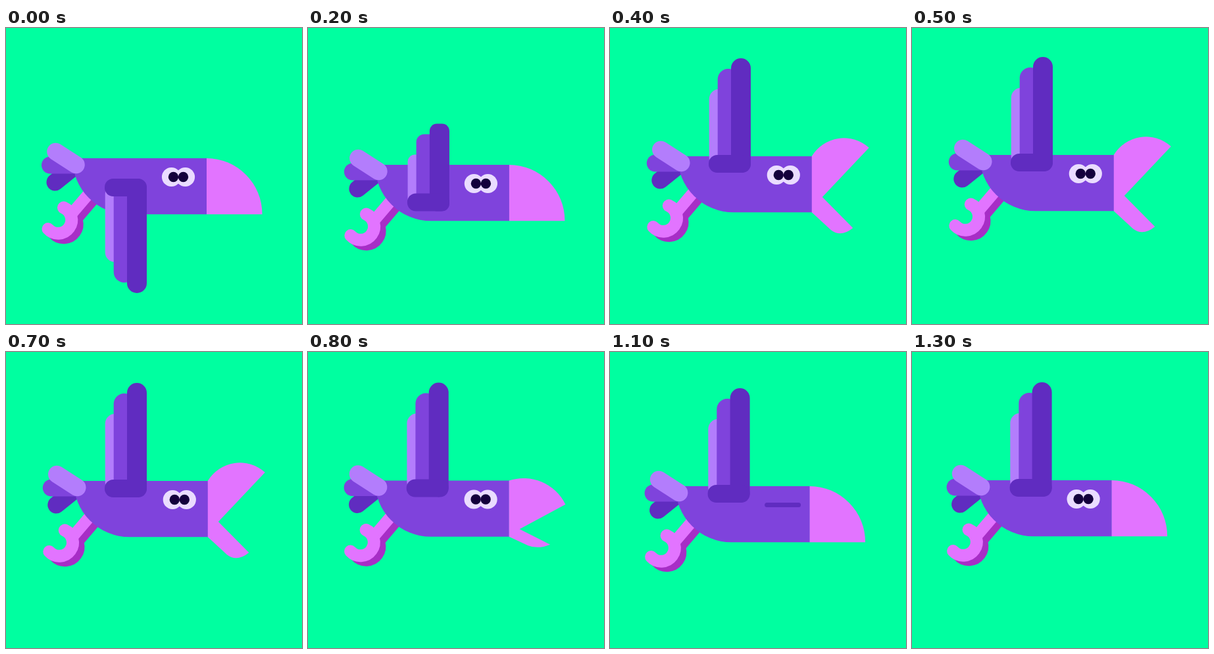
Write an HTML page that moves like this. It is 450 px wide and 450 px high and loops after 1.4 s.

```html
<!DOCTYPE html>
<html lang="en">
<head>
<meta charset="utf-8">
<title>Flying bird</title>
<style>
  html, body { margin: 0; width: 100%; height: 100%; overflow: hidden; background: #00ffa0; }
  svg { display: block; width: 100vw; height: 100vh; }
</style>
</head>
<body>
<svg viewBox="0 0 450 450">
  <defs>
    <g id="leg" fill="none">
      <path d="M133.5 243L101.5 280.5" stroke-width="17.5"/>
      <path d="M87.5 273A20.5 20.5 0 1 1 64 305.5" stroke-width="19" stroke-linecap="round"/>
    </g>
  </defs>
  <g id="bird">
    <use href="#leg" x="8.5" y="6.5" stroke="#a72ec6"/>
    <use href="#leg" stroke="#e274ff"/>
    <g fill="none" stroke-width="26" stroke-linecap="round">
      <path d="M74.5 234.5L105 210" stroke="#602cc0"/>
      <path d="M67 208.5H104" stroke="#7f43dc"/>
    </g>
    <path d="M101 198H305.3V283.3H186A85 85.3 0 0 1 101 198Z" fill="#7f43dc"/>
    <path d="M75.5 188L106.5 208" stroke="#b37dfc" stroke-width="26.5" stroke-linecap="round"/>
    <path id="beak" fill="#e274ff" transform="translate(305 198)"/>
    <g id="eyes">
      <g fill="#eadcff"><circle cx="251.5" cy="226.5" r="14.6"/><circle cx="272.5" cy="226.5" r="14.6"/></g>
      <g fill="#14003c"><circle cx="254.5" cy="226.5" r="7.7"/><circle cx="269.5" cy="226.5" r="7.7"/></g>
    </g>
    <path id="lid" d="M240 226.5H288" stroke="#602cc0" stroke-width="7" stroke-linecap="round"/>
  </g>
  <g id="wing">
    <rect id="light" x="150.7" y="8" width="30" fill="#b37dfc"/>
    <rect id="mid" x="163.7" y="8" width="32" fill="#7f43dc"/>
    <rect id="dark" x="184" width="30" fill="#602cc0"/>
    <rect x="150" width="64" height="27" rx="13" fill="#602cc0"/>
  </g>
</svg>
<script>
const el = id => document.getElementById(id);
const STEP = 100, STEPS = 14;

// key points: [step, value]
const sway = [[0, 0], [4, 1.8], [7, 1.8], [9, -0.6], [11, -1.4], [14, -1.4]];
const bob = [[0, 0], [2, 10], [4, -3], [5, -5], [7, -2], [9, -3], [10, 6], [11, 6], [13, -3], [14, 0]];
const gape = [[0, 0], [2, 0], [4, 1], [7, 1], [9, 0], [14, 0]];

function ease(keys, t) {
  const i = keys.findIndex(k => k[0] > t);
  const [t0, a] = keys[i - 1], [t1, b] = keys[i];
  return a + (b - a) * (1 - Math.cos(Math.PI * (t - t0) / (t1 - t0))) / 2;
}

// open beak: upper tip, notch, lower tip, control, chin; all sink to the body's lower edge when shut
const bill = [[87, -13], [16, 62], [62.5, 109], [44, 124], [29, 112]];

function beakPath(k) {
  const mix = (a, b) => a + (b - a) * k;
  const p = bill.map(([x, y]) => `${mix(Math.min(x, 84.5), x)} ${mix(85.3, y)}`);
  const r = mix(84.9, 57);
  return `M0 0A${r} ${r} 0 0 1 ${p[0]}L${p[1]}L${p[2]}Q${p[3]} ${p[4]}L0 85.3Z`;
}

function setFeather(id, height, r) {
  el(id).setAttribute("height", height);
  el(id).setAttribute("rx", r);
}

function drawWing(x, y, dir, bend) {
  const base = 28 - 6.5 * bend + dir * (3 - 52 * bend);
  const len = 174 - 41 * bend, r = 15 - 4 * bend;
  el("wing").setAttribute("transform", `translate(${x} ${y + base}) scale(1 ${dir})`);
  setFeather("light", len - 55, r);
  setFeather("mid", len - 24, r + 1);
  setFeather("dark", len, r);
}

function draw(t) {
  const dx = ease(sway, t), dy = ease(bob, t), open = ease(gape, t);
  const down = t < 2 || (t >= 9 && t < 11);
  const turning = t === 2 || t === 9;
  const blink = t === 11;
  el("bird").setAttribute("transform", `translate(${dx} ${dy})`);
  el("beak").setAttribute("d", beakPath(open));
  el("eyes").style.display = blink ? "none" : "";
  el("lid").style.display = blink ? "" : "none";
  // the shoulder leans back while the beak is open
  drawWing(dx - 1.8 * open, 198 + dy, down ? 1 : -1, turning ? 1 : 0);
}

function tick(now) {
  draw(Math.floor(now / STEP) % STEPS);
  requestAnimationFrame(tick);
}
draw(0);
requestAnimationFrame(tick);
</script>
</body>
</html>
```
